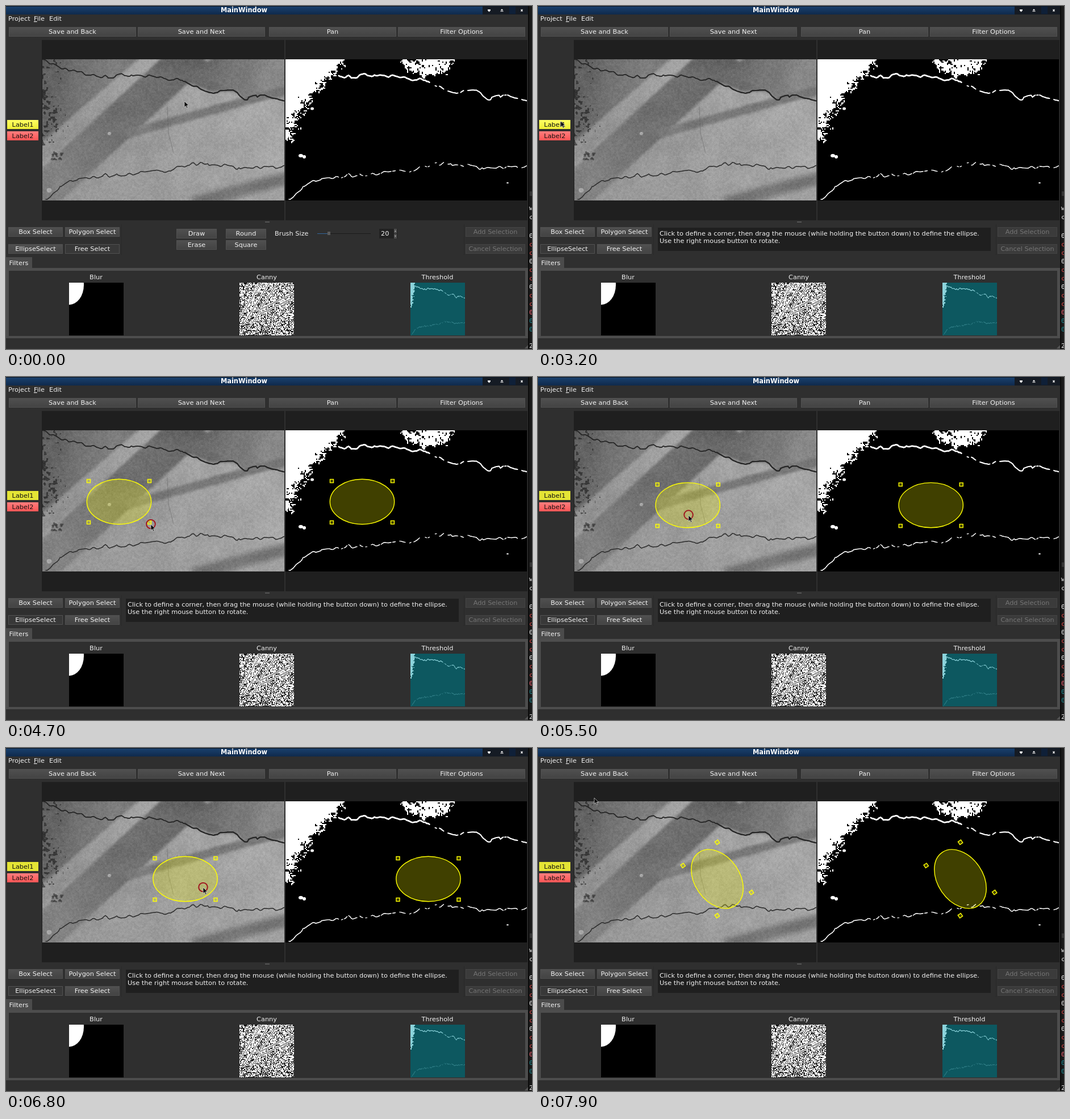
Recreate the animation shown at these times as an HTML page with a canvas. Size 926 by 605 pixels, loop 8000 ms.

```html
<!DOCTYPE html>
<html lang="en">
<head>
<meta charset="utf-8">
<title>MainWindow</title>
<style>
html, body { margin: 0; width: 100%; height: 100%; overflow: hidden; background: #2f2f2f; }
canvas, svg { position: absolute; left: 0; top: 0; width: 926px; height: 605px; }
text { font: 11.33px "DejaVu Sans", sans-serif; fill: #f2f2f2; white-space: pre; }
.mid { text-anchor: middle; }
.title { font-weight: bold; font-size: 11.4px; fill: #fff; }
.off { fill: #757575; }
.ink { fill: #111; }
.mono { font-family: "DejaVu Sans Mono", monospace; }
.sel { fill: rgba(255,255,0,.25); stroke: #ff0; stroke-width: 1.4; }
</style>
</head>
<body>
<canvas id="pictures" width="926" height="605"></canvas>
<svg id="ui" viewBox="0 0 926 605"></svg>
<script>
const ctx = document.getElementById('pictures').getContext('2d');
const ui = document.getElementById('ui');

let seed = 7;
const rand = () => {
  seed = (seed * 1664525 + 1013904223) >>> 0;
  return seed / 4294967296;
};
const mix = (a, b, u) => a + (b - a) * u;
const smooth = u => u * u * (3 - 2 * u);
const hash = (x, y) => {
  const s = Math.sin(x * 127.1 + y * 311.7) * 43758.5453;
  return s - Math.floor(s);
};
const noise = (x, y) => {
  const i = Math.floor(x), j = Math.floor(y), u = smooth(x - i), v = smooth(y - j);
  return mix(mix(hash(i, j), hash(i + 1, j), u), mix(hash(i, j + 1), hash(i + 1, j + 1), u), v);
};

/* ---------- pictures ---------- */
const upperCrack = [[64,94],[108,115],[180,125],[218,121],[310,131],[360,151],[400,151],[425,165],[440,159],[490,164]];
const lowerCrack = [[70,341],[95,320],[125,304],[195,297],[290,291],[320,279],[355,278],[410,286],[490,283]];

function box(x, y, w, h, color) {
  ctx.fillStyle = color;
  ctx.fillRect(x, y, w, h);
}
function trace(points) {
  ctx.beginPath();
  points.forEach(([x, y]) => ctx.lineTo(x, y));
}
function line(color, width, ...points) {
  ctx.strokeStyle = color;
  ctx.lineWidth = width;
  trace(points);
  ctx.stroke();
}
function area(color, ...points) {
  ctx.fillStyle = color;
  trace(points);
  ctx.fill();
}
function dot(x, y, rx, ry, color) {
  ctx.fillStyle = color;
  ctx.beginPath();
  ctx.ellipse(x, y, rx, ry, 0, 0, 7);
  ctx.fill();
}
function ramp(x0, y0, x1, y1, from, to) {
  const g = ctx.createLinearGradient(x0, y0, x1, y1);
  g.addColorStop(0, from);
  g.addColorStop(1, to);
  return g;
}
function clipped(x, y, w, h, draw) {
  ctx.save();
  ctx.beginPath();
  ctx.rect(x, y, w, h);
  ctx.clip();
  draw();
  ctx.restore();
}
function scatter(x0, y0, x1, y1, size, color, test) {
  ctx.fillStyle = color;
  for (let y = y0; y < y1; y += size)
    for (let x = x0; x < x1; x += size)
      if (test(x, y)) ctx.fillRect(x, y, size, size);
}
// A rough line through the points; width(x) of 0 leaves a gap.
function crack(points, dx, color, width) {
  let last = points[0];
  ctx.lineCap = 'round';
  points.slice(1).forEach(([bx, by], i) => {
    const [ax, ay] = points[i], n = Math.ceil((bx - ax) / 2.5);
    for (let k = 1; k <= n; k++) {
      const x = mix(ax, bx, k / n), y = mix(ay, by, k / n) + (noise(x / 7, ay) - .5) * 7;
      if (width(x)) line(color, width(x), [last[0] + dx, last[1]], [x + dx, y]);
      last = [x, y];
    }
  });
}
const broken = (x, w) => noise(x / 3, 5) > .4 ? w : 0;

function paintPhoto() {
  box(64, 94, 426, 249, ramp(200, 300, 450, 180, '#979797', '#a6a6a6'));
  ctx.filter = 'blur(2px)';
  area(ramp(64, 94, 180, 130, '#5e5e5e', '#7a7a7a'), [50, 80], [270, 80], [50, 270]);
  line(ramp(254, 94, 64, 258, '#a2a2a2', '#909090'), 28, [280, 72], [50, 270]);
  line(ramp(320, 94, 90, 310, '#636363', '#808080'), 64, [335, 79], [50, 343]);
  area(ramp(330, 94, 480, 120, '#636363', '#8a8a8a'), [380, 80], ...upperCrack.slice(4), [500, 80]);
  line('#777', 15, [500, 146], [212, 226]);
  ctx.filter = 'blur(4px)';
  line('#747474', 22, [500, 302], [330, 348]);
  ctx.filter = 'none';

  scatter(64, 94, 130, 246, 1, 'rgba(32,32,32,.6)', (x, y) =>
    noise(x / 4, y / 4) + noise(x / 14, y / 14) * .3 > .76 + (x - 64) / 120);
  for (let i = 0; i < 26; i++)
    dot(80 + 22 * rand(), 257 + 14 * rand(), 1 + 2 * rand(), 1 + rand(), 'rgba(50,50,50,.6)');
  dot(182, 225, 3, 3, '#aaa');
  dot(76, 325, 4.5, 4, '#a8a8a8');

  const img = ctx.getImageData(64, 94, 426, 249);
  for (let i = 0; i < img.data.length; i += 4) {
    const x = i / 4 % 426, y = Math.floor(i / 4 / 426);
    const d = (rand() - .5) * 14 + (noise(x / 3, y / 3) - .5) * 14 + (noise(x / 30, y / 30) - .5) * 12;
    for (let c = 0; c < 3; c++) img.data[i + c] += d;
  }
  ctx.putImageData(img, 64, 94);

  crack([[284, 178], [286, 225], [295, 262]], 0, 'rgba(80,80,80,.5)', () => .8);
  crack(upperCrack, 0, '#262626', x => x > 315 ? 2.2 : 1.7);
  crack(lowerCrack, 0, '#303030', () => 1.5);
}

function paintMask() {
  box(492, 94, 425, 249, '#000');
  const rough = (x, y) => (noise(x / 5, y / 5) - .5) * 30 + (hash(x, y) - .5) * 18;
  scatter(492, 94, 606, 243, 2, '#fff', (x, y) =>
    x < 492 + 106 * (1 - (y - 94) / 150) ** 1.6 + rough(x, y));
  scatter(694, 94, 792, 128, 2, '#fff', (x, y) =>
    y < 94 + 27 * (1 - ((x - 742) / 48) ** 4) + rough(x, y) / 3 && noise(x / 3 + 40, y / 3) < .72);
  crack(upperCrack, 428, '#fff', x => x < 160 ? 0 : x < 320 ? 2.6 : broken(x, 2));
  crack(lowerCrack, 428, '#fff', x => x < 135 ? 1.5 : broken(x, 1.4));
  dot(519, 264, 4, 3, '#fff');
  dot(525, 266, 3, 3, '#fff');
  dot(495, 227, 3, 7, '#fff');
  dot(504, 210, 4, 4, '#fff');
  dot(539, 181, 3, 2.5, '#fff');
  dot(883, 312, 2, 1, '#fff');
}

function paintThumbs() {
  box(111, 488, 96, 93, '#000');
  clipped(111, 488, 96, 93, () => dot(111, 492, 26, 35, '#fff'));

  box(411, 488, 96, 93, '#fff');
  scatter(411, 488, 507, 581, 1, '#161616', (x, y) => Math.abs(noise(x / 1.6, y / 1.6) - .5) < .13);
  clipped(411, 488, 96, 93, () => {
    for (let i = 0; i < 5; i++) {
      const ends = i < 3 ? [[405 + 14 * i, 560], [450 + 14 * i, 488]] : [[446, 536 + 8 * (i - 3)], [507, 506 + 8 * (i - 3)]];
      line('#fff', 3.5, ...ends);
      line('#222', 1, ...ends);
    }
  });

  box(712, 488, 96, 93, '#0d5860');
  scatter(712, 488, 724, 532, 1, '#8bd3db', (x, y) =>
    x < 720 - (y - 488) * .15 + (noise(x / 2, y / 2) - .5) * 6);
  clipped(712, 488, 96, 93, () => {
    ctx.translate(712, 488);
    ctx.scale(96 / 426, 93 / 249);
    ctx.translate(-64, -94);
    crack(upperCrack, 0, '#8bd3db', x => x < 80 ? 0 : x < 320 ? 3 : broken(x, 2.6));
    crack(lowerCrack, 0, '#3f8d95', x => broken(x, 2));
  });
}

box(0, 0, 926, 605, '#2f2f2f');
box(63, 60, 427, 318, '#1f1f1f');
box(492, 60, 426, 318, '#1f1f1f');
clipped(64, 94, 426, 249, paintPhoto);
clipped(492, 94, 425, 249, paintMask);
paintThumbs();

/* ---------- window ---------- */
const rect = (x, y, w, h, fill, extra = '') =>
  `<rect x="${x}" y="${y}" width="${w}" height="${h}" fill="${fill}" ${extra}/>`;
const text = (x, y, s, cls = '', extra = '') => `<text x="${x}" y="${y}" class="${cls}" ${extra}>${s}</text>`;
const button = (x, y, w, s, cls = '', id = '') =>
  rect(x + .5, y + .5, w - 1, 16, cls ? '#3b3b3b' : 'url(#face)', `stroke="${cls ? '#444' : '#515151'}" id="${id}"`) +
  text(x + w / 2, y + 12, s, 'mid ' + cls);
const glyph = (d, fill = '#eee') => `<path d="${d}" fill="${fill}"/>`;
const gradient = (id, a, b) => `<linearGradient id="${id}" x2="0" y2="1"><stop stop-color="${a}"/>` +
  `<stop offset="1" stop-color="${b}"/></linearGradient>`;

const defs = '<defs>' + gradient('face', '#505050', '#434343') + gradient('bar', '#1a416f', '#0f2a4c') +
  gradient('yellow', '#ffff63', '#eeee35') + gradient('red', '#ff7d7d', '#ff5555') + '</defs>';

const topBar = rect(0, 0, 920, 15, 'url(#bar)') + rect(839, 0, 81, 15, '#151b24') +
  rect(886, 1, 11, 13, '#0f2038') + rect(0, 0, 920, 1, '#0a1420') + text(419, 11, 'MainWindow', 'mid title') +
  glyph('M848 6h5v2l-2.5 2.5l-2.5-2.5z') + glyph('M870.5 8l2.5-3l2.5 3zM870.5 9h5v1h-5z') +
  '<path d="M906.5 6l3 3.5m0-3.5l-3 3.5" stroke="#eee" stroke-width="1.3"/>' +
  text(4, 26, 'Project') + text(49, 26, '<tspan text-decoration="underline">F</tspan>ile') + text(76, 26, 'Edit') +
  button(5, 37, 224, 'Save and Back') + button(232, 37, 224, 'Save and Next') +
  button(463, 37, 224, 'Pan') + button(690, 37, 224, 'Filter Options');

const labels = rect(2, 201, 55, 16, 'url(#yellow)', 'id="label1"') + text(29.5, 213, 'Label1', 'mid ink') +
  rect(2, 221, 55, 16, 'url(#red)') + text(29.5, 233, 'Label2', 'mid ink');

const tools = rect(456, 380, 8, 2, '#555') +
  button(4, 390, 96, 'Box Select') + button(104, 390, 96, 'Polygon Select') +
  button(4, 420, 96, 'EllipseSelect', '', 'ellipse') + button(104, 420, 96, 'Free Select', '', 'free') +
  button(809, 390, 105, 'Add Selection', 'off') + button(809, 420, 105, 'Cancel Selection', 'off') +
  rect(203, 385, 1, 54, '#292929') + rect(806, 385, 1, 54, '#292929');

const brush = button(300, 393, 71, 'Draw') + button(300, 413, 71, 'Erase') +
  button(387, 393, 71, 'Round') + button(387, 413, 71, 'Square') + text(473, 405, 'Brush Size') +
  rect(548, 401, 94, 1, '#1b1b1b') + rect(548, 401, 20, 1, '#33669a') +
  rect(566, 398, 5, 6, '#5b5b5b') + rect(657, 393, 32, 17, '#212121') + text(660, 405, '20') +
  rect(683, 393, 5, 8, '#505050') + rect(683, 402, 5, 8, '#505050') +
  glyph('M684 398l1.5-2l1.5 2zM684 405l1.5 2l1.5-2z', '#bbb');

const hint = rect(211, 391, 586, 41, '#1f1f1f') +
  text(214, 405, 'Click to define a corner, then drag the mouse (while holding the button down) to define the ellipse.') +
  text(214, 418, 'Use the right mouse button to rotate.');

const filters = rect(0, 443, 46, 20, '#4b4b4b') + text(5.5, 457, 'Filters') +
  '<path d="M0 462H919V586H0ZM5 467V582H914V467Z" fill="#4d4d4d" fill-rule="evenodd"/>' +
  ['Blur', 'Canny', 'Threshold'].map((s, i) => text(158.5 + 300.5 * i, 482, s, 'mid')).join('') +
  glyph('M919 598v6h-6z', '#555');

const sideColor = i => i > 9 ? '#1b8c94' : i % 3 ? '#e04848' : i === 9 ? '#f06070' : '#f2f2f2';
const side = rect(919, 0, 7, 605, '#191919') + rect(919, 0, 2, 605, '#0c0c0c') + rect(922, 327, 4, 8, '#333') +
  text(921, 360, 'w', 'mono') + text(921, 376, 'c', 'mono') + text(921, 603, '2', 'mono') +
  Array.from({ length: 12 }, (_, i) =>
    text(921, 409 + 15 * i, i % 3 && i < 10 ? 'c' : '0', 'mono', `style="fill:${sideColor(i)}"`)).join('');

const corners = [[-1, -1], [1, -1], [1, 1], [-1, 1]];
const shape = '<g class="shape"><ellipse class="sel"/>' +
  '<rect class="sel" x="-3" y="-3" width="6" height="6"/>'.repeat(4) + '</g>';

ui.innerHTML = defs + topBar + labels + tools +
  `<g id="brush">${brush}</g><g id="hint">${hint}</g>` + filters + side + shape + shape +
  '<circle id="press" r="7.8" fill="none" stroke="#a01820" stroke-width="2"/>' +
  '<path id="cursor" d="M0 0V10.5L2.5 8.3L4.3 12.2L6 11.4L4.3 7.6H7.8Z" fill="#0a0a0a" stroke="#ddd" stroke-width=".7"/>';

/* ---------- motion ---------- */
// Each move is [start, end, ...values reached]; the values rest in between.
function follow(first, moves, t) {
  return moves.reduce((now, [a, b, ...goal]) => {
    const u = Math.min(1, Math.max(0, (t - a) / (b - a)));
    return now.map((v, i) => mix(v, goal[i], u * (2 - u)));
  }, first);
}
const cursorMoves = [[300,1200,51,408], [1200,1700,46,423], [2100,2400,47,335], [2600,3200,40,203],
  [3500,3900,140,179], [4200,4700,255,260], [4800,5100,200,238], [5300,5900,317,249],
  [6000,6400,347,246], [6800,7300,323,279], [7500,7900,99,88]];
const presses = [[1900,2000], [3400,3600], [4300,4800], [5400,6100], [6800,7600]];

const find = id => document.getElementById(id);
const set = (el, attrs) => Object.entries(attrs).forEach(([k, v]) => el.setAttribute(k, v));
const show = (el, on) => { el.style.display = on ? '' : 'none'; };
const shapes = [...document.querySelectorAll('.shape')];

function draw(t) {
  const [x, y] = follow([314, 168], cursorMoves, t);
  const [angle] = follow([0], [[6800, 7300, 55.8]], t);
  let [cx, cy] = follow([199, 220], [[5300, 5900, 315.5, 231]], t);
  let rx = 56.7, ry = 39.7;
  if (t < 4700) {
    rx = Math.max(1, (x - 141) / 2);
    ry = Math.max(1, (y - 180) / 2);
    cx = 142 + rx;
    cy = 180 + ry;
  }
  shapes.forEach((g, i) => {
    show(g, t >= 4300);
    set(g, { transform: `translate(${cx + 428 * i} ${cy}) rotate(${angle})` });
    set(g.children[0], { rx, ry });
    corners.forEach(([sx, sy], k) =>
      set(g.children[k + 1], { transform: `translate(${sx * (rx - 3.2)} ${sy * (ry - 3.2)})` }));
  });
  const dragging = t >= 5400 && t < 6100;
  set(find('cursor'), { transform: `translate(${x} ${y})` });
  set(find('press'), { cx: dragging ? cx + 1.3 : x, cy: dragging ? cy + 17 : y - .5 });
  show(find('press'), presses.some(([a, b]) => t >= a && t < b));

  const ellipseMode = t >= 2000;
  show(find('brush'), !ellipseMode);
  show(find('hint'), ellipseMode);
  set(find('ellipse'), { fill: ellipseMode ? '#383838' : 'url(#face)' });
  set(find('free'), { fill: ellipseMode ? 'url(#face)' : '#383838' });
  set(find('label1'), { fill: t < 3400 ? 'url(#yellow)' : '#e4e435' });
}

const start = performance.now();
function tick() {
  const t = (performance.now() - start) % 8000;
  draw(Math.floor(t / 100) * 100);
  requestAnimationFrame(tick);
}
tick();
</script>
</body>
</html>
```
